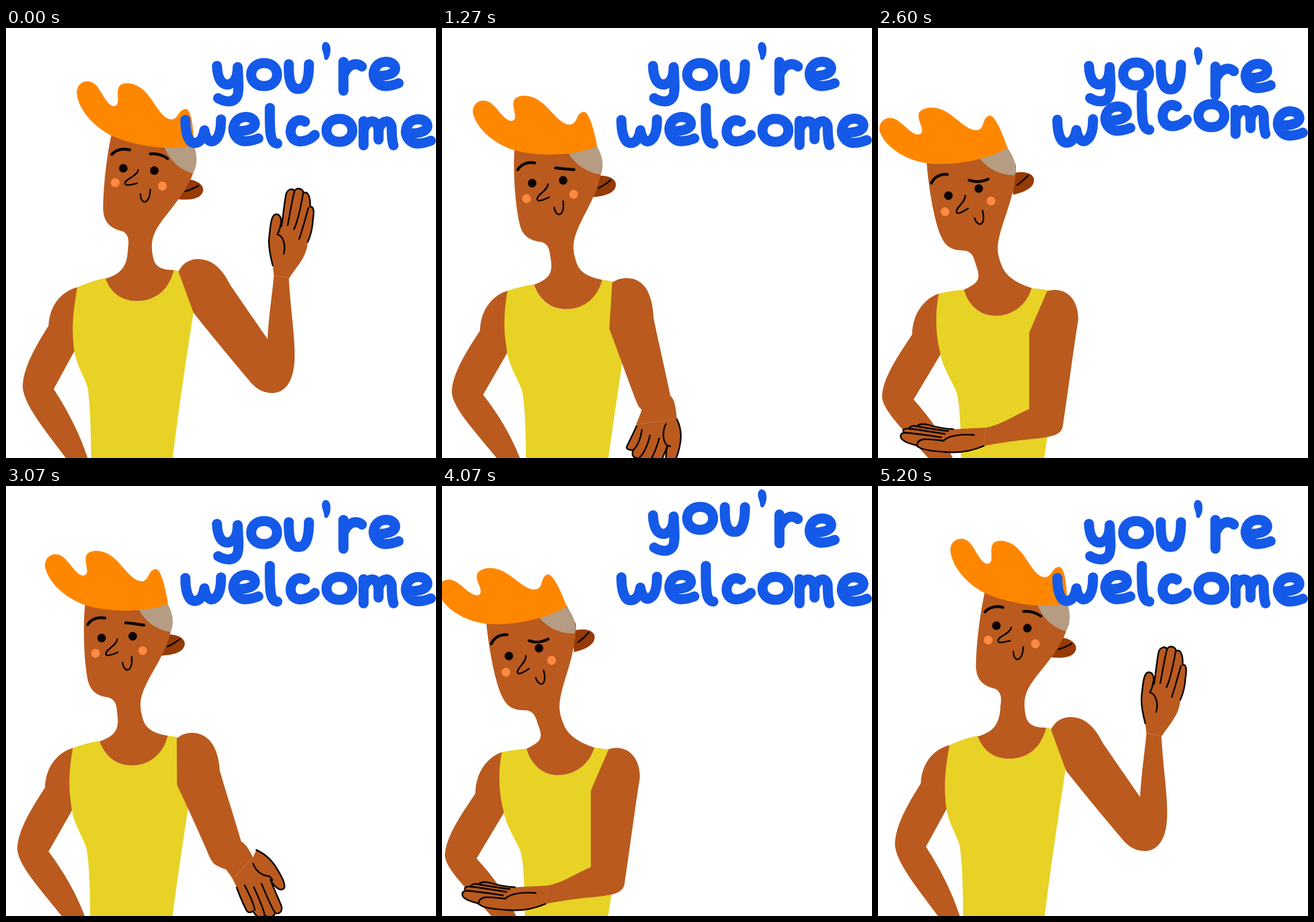
Write an HTML page that moves like this. It is 748 px wide and 748 px high and loops after 5270 ms.

```html
<!DOCTYPE html>
<html lang="en">
<head>
<meta charset="utf-8">
<title>You're welcome</title>
<style>
html, body { margin: 0; width: 100%; height: 100%; overflow: hidden; background: #fff; }
svg { display: block; width: 100vw; height: 100vh; }
.skin { fill: #ba5a1e; }
.ink { fill: none; stroke: #0b0502; stroke-width: 2.8; stroke-linecap: round; stroke-linejoin: round; }
.brow { stroke-width: 5; }
.letter { fill: none; stroke: #1459e8; stroke-width: 17.5; stroke-linecap: round; stroke-linejoin: round; }
</style>
</head>
<body>
<svg viewBox="0 0 748 748" role="img" aria-label="you're welcome">
  <g id="ear">
    <path fill="#963b06" d="M310 262C332 264 343 272 343 282C341 297 322 300 300 298Z"/>
    <path class="ink" d="M312 284C320 282 328 278 335 274"/>
  </g>
  <path id="backArm" class="skin"/>
  <path id="shirt" fill="#e8d225"/>
  <path id="headSkin" class="skin"/>
  <g id="hair">
    <path fill="#b59c83" d="M275 206C285 233 305 247 325 253C333 240 334 222 326 203L275 200Z"/>
    <path fill="#ff8700" d="M183 187C150 170 125 140 123 112C124 92 145 87 157 100C168 112 176 136 188 136C202 134 188 110 199 99C210 92 228 98 238 107C258 124 268 158 288 159C300 159 300 140 314 141C323 144 326 175 327 204C290 213 230 208 183 187Z"/>
  </g>
  <g id="face">
    <path id="browLeft" class="ink brow"/>
    <path id="browRight" class="ink brow"/>
    <g fill="#0b0502"><circle cx="204" cy="244" r="7.5"/><circle cx="258" cy="248" r="7.5"/></g>
    <g fill="#ff8a42"><circle cx="190" cy="269" r="7.7"/><circle cx="272" cy="275" r="7.7"/></g>
    <path id="noseMouth" class="ink" d="M230 247C228 258 208 262 207 270C207 276 220 272 228 270M234 289C234 308 250 308 251 281"/>
  </g>
  <g id="frontArm">
    <path id="arm" class="skin"/>
    <path id="palm" class="skin"/>
    <path id="fingers" class="ink"/>
  </g>
  <g id="words"></g>
</svg>
<script>
const $ = id => document.getElementById(id);
const LOOP = 5270, FRAMES = 79, FRAME = LOOP / FRAMES, CYCLE = 1766.7;
const NUMBER = /-?[\d.]+/g;
const parse = d => d.match(NUMBER).map(Number);
const write = (d, values) => { let i = 0; return d.replace(NUMBER, () => values[i++].toFixed(1)); };
const clamp = (v, lo, hi) => Math.min(hi, Math.max(lo, v));

// Smooth curve through (keys, values), flat at both ends.
function curve(keys, values, t) {
  const last = keys.length - 1;
  if (t <= keys[0]) return values[0];
  if (t >= keys[last]) return values[last];
  let i = 0;
  while (t >= keys[i + 1]) i++;
  const slope = j => j === 0 || j === last ? 0 : (values[j + 1] - values[j - 1]) / (keys[j + 1] - keys[j - 1]);
  const h = keys[i + 1] - keys[i], u = (t - keys[i]) / h, w = 1 - u;
  return values[i] * w * w * (1 + 2 * u) + values[i + 1] * u * u * (3 - 2 * u)
    + h * u * w * (slope(i) * w - slope(i + 1) * u);
}

function morph(from, to) {
  const a = parse(from), b = parse(to);
  return p => write(from, a.map((v, i) => v + (b[i] - v) * p));
}

// Bow amount over one cycle: 0 waving, 1 fully bowed.
const BOW_TIMES = [0, 80, 167, 300, 420, 533, 633, 733, 833, 1067, 1150, 1267, 1367, 1500, 1590, 1667, 1733, 1767];
const BOW = [0, .07, .286, .75, .98, 1, .95, .92, .917, .917, .83, .5, .2, -.06, -.065, -.02, 0, 0];

const bodyShapes = {
  backArm: morph(
    "M124 451C98 458 76 480 74 518C52 553 30 590 29 624C31 655 66 697 104 748L142 748C128 705 107 665 83 628L119 562L126 500Z",
    "M104 463C78 472 58 500 58 535C36 568 6 610 5 643C7 668 46 703 86 748L129 748C112 712 90 680 60 648L108 568L108 510Z"),
  shirt: morph(
    "M124 451C140 444 157 438 173 435C182 460 200 475 228 475C260 475 284 455 292 421L308 424L326 495C316 560 302 650 290 748L148 748C148 700 146 650 142 626C137 605 119 585 117 545C114 510 119 480 124 451Z",
    "M104 463C118 460 133 458 147 457C155 485 175 503 202 503C235 503 258 480 265 455L296 459L318 560C306 640 298 690 289 748L144 748C144 700 142 650 136 634C128 615 111 590 107 565C98 530 98 495 104 463Z"),
  headSkin: morph(
    "M183 187C174 230 169 280 169 315C170 345 190 350 204 354C216 362 213 375 212 385C211 415 200 428 173 436C182 460 200 475 228 475C260 475 284 455 292 421C275 421 260 418 256 400C251 375 254 360 268 340C285 315 330 270 331 225L327 200Z",
    "M77 237C80 270 90 335 104 365C113 385 125 390 143 390C160 390 163 402 167 415C177 440 172 445 147 457C155 485 175 503 202 503C235 503 258 480 265 455C240 447 222 435 214 420C203 395 202 385 208 358C218 320 233 285 233 240L217 208Z"),
  browLeft: morph("M184 220C192 211 204 209 215 212", "M182 214C190 205 202 203 213 208"),
  browRight: morph("M251 219C264 218 274 222 281 227", "M246 230C254 237 266 240 278 238")
};

// Arm poses: waving, reaching out, hanging, folded.
const POSES = [0, .286, .5, .917];
const armPaths = [
  "M300 424C308 407 322 402 334 402C358 402 376 418 390 447C410 476 432 508 455 541C457 500 463 465 466 430L492 435C495 490 503 540 502 572C502 610 488 635 463 635C445 635 432 625 422 612C390 574 355 532 326 495Z",
  "M298 436C305 427 315 423 326 423C352 424 372 445 376 483C390 520 404 556 419 595C424 594 430 595 436 597L446 653C436 654 428 657 420 660C412 662 405 662 398 661C386 660 378 651 372 638C352 598 326 553 304 515Z",
  "M296 443C304 437 313 435 322 435C350 436 366 458 368 505C376 545 388 595 397 640C402 644 406 652 408 680L337 690C341 682 345 674 347 664C345 662 343 660 341 657C339 652 336 646 334 640C320 602 305 561 291 523Z",
  "M294 458C299 456 306 455 312 456C336 458 350 482 348 510C342 545 329 645 322 690C318 720 280 708 184 727L188 695C215 690 240 672 263 663C263 650 263 640 263 630C263 610 263 590 263 575C263 560 263 545 263 530Z"
];
const hands = [
  { x: 479, y: 432, turn: -78,
    edge: "M464 413C458 390 456 375 458 362C460 345 461 324 470 324C478 324 479 332 479 345C482 330 484 305 487 290C489 280 499 278 502 284C504 278 515 277 518 287C524 283 530 292 529 311C536 310 536 320 534 333C533 350 529 363 525 372",
    wrist: "C523 400 505 415 492 436",
    lines: "M502 284C497 300 494 325 490 343M517 287C513 310 508 335 501 350M526 313C521 330 516 350 510 367M478 340C477 347 475 354 472 359C483 362 487 378 483 393" },
  { x: 440, y: 625, turn: 8,
    edge: "M432 598C448 593 464 591 480 594C497 597 520 599 521 606C521 614 515 616 502 613C518 620 538 623 555 626C566 628 567 638 562 641C566 645 567 655 557 655C561 664 552 668 533 667C531 672 524 673 515 671C500 669 485 666 473 661",
    wrist: "C465 658 455 656 447 654",
    lines: "M562 641C545 641 520 636 502 628M557 655C540 652 515 646 496 639M533 660C525 658 500 652 478 645M508 613C500 611 492 609 486 609C478 618 466 623 452 618" },
  { x: 372, y: 672, turn: 118,
    edge: "M408 681C415 695 417 710 412 730C408 748 403 758 396 760C386 760 388 740 391 728C384 745 378 760 372 768C364 774 356 768 358 762C350 766 341 758 342 748C334 750 327 744 332 734C325 735 318 732 321 727C327 715 333 703 338 692",
    wrist: "C341 684 345 674 347 665",
    lines: "M358 762C362 750 372 735 377 714M343 747C352 738 357 725 361 709M332 734C341 725 345 714 347 699M396 728C394 727 392 727 390 726C383 718 382 702 389 689" },
  { x: 186, y: 711, turn: 183,
    edge: "M184 727C165 735 145 739 125 738C105 737 78 735 71 729C69 728 68 728 67 726C60 724 50 722 45 718C37 713 38 705 46 704C41 699 45 696 54 697C56 692 62 691 68 693C70 689 78 688 86 690C100 694 115 697 131 698",
    wrist: "C150 697 170 696 189 695",
    lines: "M46 704C65 705 90 709 110 712M54 697C75 699 95 703 116 706M68 693C85 696 103 699 122 701M68 726C68 710 95 716 114 718C122 709 145 706 167 708" }
];

function rotate(values, degrees) {
  const c = Math.cos(degrees * Math.PI / 180), s = Math.sin(degrees * Math.PI / 180);
  return values.map((v, i) => i % 2 ? values[i - 1] * s + v * c : v * c - values[i + 1] * s);
}

const blend = (lists, p) => lists[0].map((_, i) => curve(POSES, lists.map(l => l[i]), p));
const armPoints = armPaths.map(parse);
const handAnchors = hands.map(h => [h.x, h.y, h.turn]);
const handPart = name => hands.map(h =>
  rotate(parse(h[name]).map((v, i) => v - (i % 2 ? h.y : h.x)), -h.turn));
const handParts = { edge: handPart("edge"), wrist: handPart("wrist"), lines: handPart("lines") };

function drawArm(p) {
  const k = clamp(p, 0, .917);
  const [x, y, turn] = blend(handAnchors, k);
  const part = name => write(hands[0][name],
    rotate(blend(handParts[name], k), turn).map((v, i) => v + (i % 2 ? y : x)));
  const edge = part("edge");
  const armNow = blend(armPoints, k);
  // The two wrist corners of the arm close the palm, so the joint never opens.
  const [innerX, innerY, outerX, outerY] = armNow.slice(24, 28);
  $("arm").setAttribute("d", write(armPaths[0], armNow));
  $("palm").setAttribute("d", `${edge}${part("wrist")}L${outerX} ${outerY}L${innerX} ${innerY}Z`);
  $("fingers").setAttribute("d", edge + part("lines"));
  $("frontArm").setAttribute("transform", `translate(${-50 * (p - k)} 0)`);
}

function drawBody(p) {
  for (const id in bodyShapes) $(id).setAttribute("d", bodyShapes[id](p));
  const lead = 12.5 * p * (1 - p);
  const x = 231 - 88.5 * p - lead, y = 246 + 43 * p;
  const tilt = (id, dx, dy) => $(id).setAttribute("transform",
    `translate(${x + dx * p} ${y + dy * p}) rotate(${-18.8 * p}) translate(-231 -246)`);
  tilt("face", 0, 0);
  tilt("hair", -3, -9);
  tilt("ear", 5, -27);
  const lean = lead / 170;
  $("headSkin").setAttribute("transform", `matrix(1 0 ${lean} 1 ${-440 * lean} 0)`);
  $("noseMouth").setAttribute("transform", `translate(${2 * p} ${6 * p})`);
}

// Lettering: [stroke, x, y] per letter, and the wave that lifts it.
const E = "M640 82C654 85 677 82 677 70C676 56 650 54 642 70C635 85 645 101 660 101C670 101 678 98 683 96";
const O = "M449 61C479 61 479 101 449 101C419 101 419 61 449 61Z";
const lines = [
  { crest: 448, step: 53, letters: [
    ["M367 66C368 90 376 100 388 98C398 95 403 85 403 68C404 90 406 110 402 119C395 132 378 128 369 122"],
    [O],
    ["M492 63C491 95 497 106 509 106C521 106 527 92 527 63"],
    ["M553 33C553 25 561 26 561 38C561 44 559 49 557 52C557 45 553 39 553 33Z"],
    ["M587 59L587 109M587 82C594 64 608 58 619 67"],
    [E]] },
  { crest: 723, step: 35, letters: [
    ["M312 160C312 185 318 200 328 200C338 200 343 190 345 178C348 195 356 200 362 196C372 190 374 175 374 159"],
    [E, -244, 96],
    ["M459 139C459 170 457 200 472 201"],
    ["M520 163C508 156 496 164 495 180C496 204 525 200 537 186"],
    [O, 131, 97],
    ["M622 162L622 204M622 178C626 160 646 155 648 178L648 194M648 178C652 158 671 158 671 175C671 190 672 198 674 204"],
    [E, 56, 100]] }
];
const WAVE_TIMES = [-203, -180, -127, -74, -21, 32, 85, 120, 173, 226, 279, 325, 400];
const WAVE = [0, -2, -9, -18, -26, -25, -16, 3, 8, 9, 1, -1, 0];

const glyphs = lines.flatMap(({ crest, step, letters }) => letters.map(([d, x = 0, y = 0], i) => {
  const el = document.createElementNS("http://www.w3.org/2000/svg", "path");
  el.setAttribute("d", d);
  el.setAttribute("class", "letter");
  if (d.startsWith("M553")) el.setAttribute("style", "stroke-width:7;fill:#1459e8");
  $("words").append(el);
  return { el, x, y, crest: crest + i * step };
}));

function draw(ms) {
  // Frame starts fall on whole hundredths of a second, slightly before the even grid.
  const frame = Math.floor((ms % LOOP) / FRAME + .1) % FRAMES;
  const phase = frame * FRAME % CYCLE;
  const bow = curve(BOW_TIMES, BOW, phase);
  drawBody(bow);
  drawArm(bow);
  for (const { el, x, y, crest } of glyphs)
    el.setAttribute("transform", `translate(${x} ${y + curve(WAVE_TIMES, WAVE, phase - crest)})`);
}

const start = performance.now();
function tick() {
  draw(performance.now() - start);
  requestAnimationFrame(tick);
}
tick();
</script>
</body>
</html>
```
